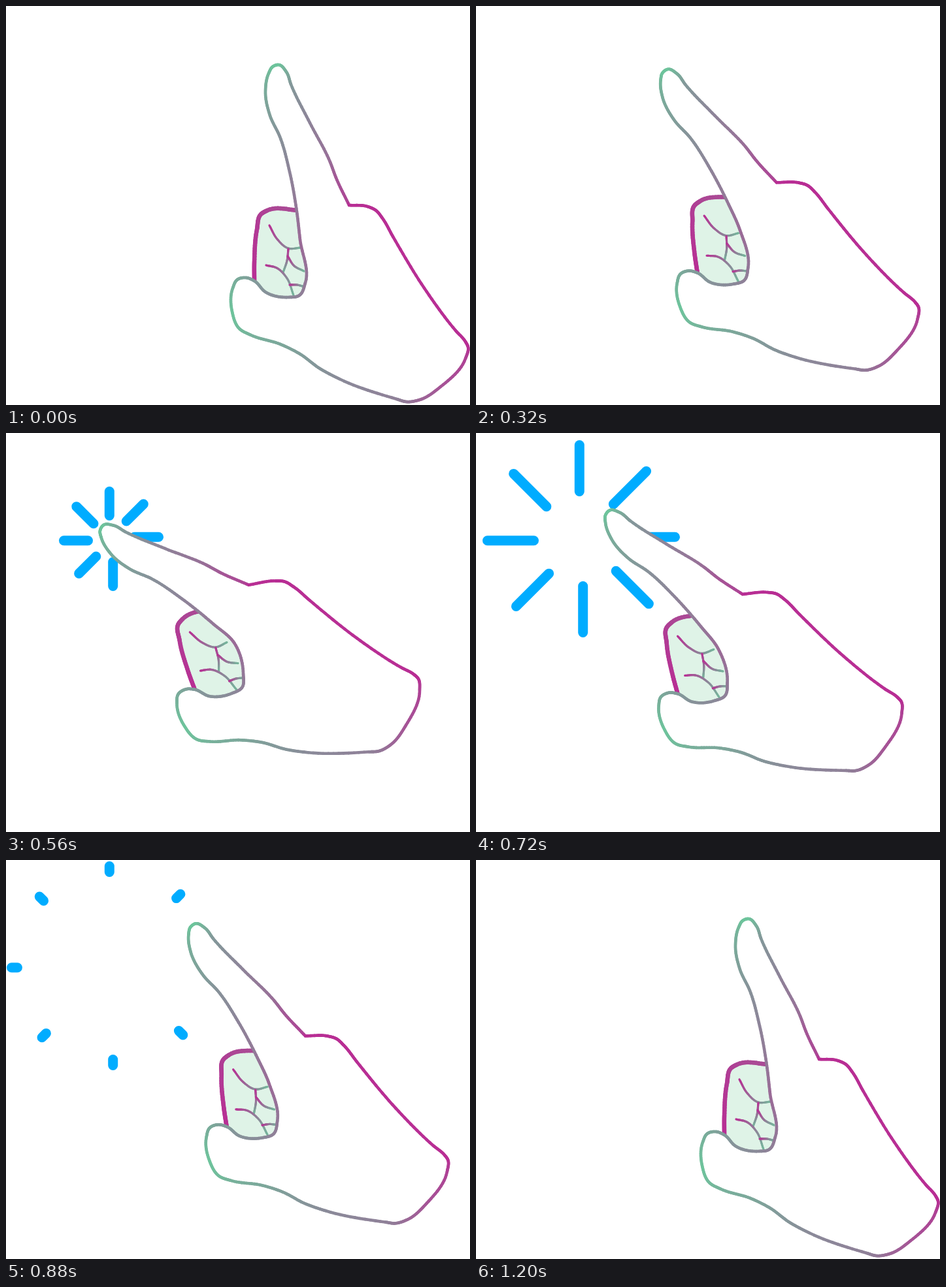
Write an HTML page with a canvas that moves like this. It is 710 px wide and 611 px high and loops after 1360 ms.

```html
<!DOCTYPE html>
<html lang="en">
<head>
<meta charset="utf-8">
<title>Tapping hand</title>
<style>
  html, body { margin: 0; height: 100%; overflow: hidden; background: #fff; }
  canvas { display: block; }
</style>
</head>
<body>
<canvas id="stage" width="710" height="611"></canvas>
<script>
const ctx = document.getElementById('stage').getContext('2d');
const LOOP = 1360, STEP = 80, HIT = 560, REST = 1200;
const GREEN = [110, 196, 156], MAGENTA = [184, 46, 148];

// The palm turns while it shifts; the finger turns further about its knuckle.
const PALM = { center: [566.5, 486.75], angle: -20, shift: [-80, -96] };
const FINGER = { center: [502, 336], angle: -21, shift: [0, 0] };

const clamp = (v, lo, hi) => Math.min(hi, Math.max(lo, v));

function tapAmount(ms) {
  if (ms <= HIT) return (ms / HIT) ** 1.55;
  const v = (REST - ms) / (REST - HIT);
  return .6 * v * v * (3 - 2 * v) + .4 * v ** 1.6;
}

function move([x, y], { center: [cx, cy], angle, shift }, amount) {
  const a = angle * amount * Math.PI / 180, c = Math.cos(a), s = Math.sin(a);
  const dx = x - cx, dy = y - cy;
  return [cx + dx * c - dy * s + shift[0] * amount, cy + dx * s + dy * c + shift[1] * amount];
}

// Adds a tint running evenly along the points: 0 green, 1 magenta.
const tinted = (from, to, pts) =>
  pts.map((p, i) => [...p, from + (to - from) * i / (pts.length - 1)]);

// Samples a smooth curve; a repeated point makes a sharp corner.
function smooth(pts, closed) {
  const n = pts.length, out = [];
  const at = i => closed ? pts[(i + n) % n] : pts[clamp(i, 0, n - 1)];
  const heading = i => {
    let hx = 0, hy = 0;
    for (const k of [i - 1, i]) {
      const a = at(k), b = at(k + 1), dx = b[0] - a[0], dy = b[1] - a[1];
      const d2 = dx * dx + dy * dy || 1;
      hx += dx / d2;
      hy += dy / d2;
    }
    const len = Math.hypot(hx, hy) || 1;
    return [hx / len, hy / len];
  };
  for (let i = 0; i < (closed ? n : n - 1); i++) {
    const a = at(i), b = at(i + 1), ha = heading(i), hb = heading(i + 1);
    const len = Math.hypot(b[0] - a[0], b[1] - a[1]);
    if (!len) continue;
    for (let k = 0; k < 12; k++) {
      const u = k / 12, w = 1 - u;
      const mix = j => a[j] * w * w * (w + 3 * u) + b[j] * u * u * (u + 3 * w)
        + len * u * w * (ha[j] * w - hb[j] * u);
      out.push([mix(0), mix(1), a[2] * w + b[2] * u]);
    }
  }
  out.push(at(closed ? 0 : n - 1));
  return out;
}

function fill(pts, color) {
  ctx.beginPath();
  pts.forEach(p => ctx.lineTo(p[0], p[1]));
  ctx.fillStyle = color;
  ctx.fill();
}

function line(x1, y1, x2, y2) {
  ctx.beginPath();
  ctx.moveTo(x1, y1);
  ctx.lineTo(x2, y2);
  ctx.stroke();
}

function tintedStroke(pts, width) {
  ctx.lineWidth = width;
  for (let i = 1; i < pts.length; i++) {
    const [x1, y1, c1] = pts[i - 1], [x2, y2, c2] = pts[i];
    const c = (c1 + c2) / 2;
    ctx.strokeStyle = `rgb(${GREEN.map((g, j) => Math.round(g + (MAGENTA[j] - g) * c))})`;
    line(x1, y1, x2, y2);
  }
}

function drawRays(ms) {
  const reach = t => clamp(72.5 + .444 * (t - HIT), 35.5, 152.5);
  const inner = reach(ms - 160), outer = reach(ms);
  if (outer - inner < 2) return;
  ctx.strokeStyle = '#00acff';
  ctx.lineWidth = 15;
  for (let i = 0; i < 8; i++) {
    ctx.save();
    ctx.translate(161, 162);
    ctx.rotate(i * Math.PI / 4);
    line(-2.7, -inner, -2.7, -outer);
    ctx.restore();
  }
}

function drawHand(amount) {
  const palm = (...pts) => pts.map(p => move(p, PALM, amount));
  const finger = (...pts) => palm(...pts.map(p => move(p, FINGER, amount)));
  const crease = (...pts) => tintedStroke(smooth(tinted(1, .1, palm(...pts))), 3.2);

  // Folded fingers
  const fold = smooth(tinted(.8, 1, palm(
    [450, 313], [400, 313], [390, 319], [384, 342], [380, 392], [380, 422])));
  fill([...fold, ...palm([370, 430], [400, 455], [480, 450], [480, 330])], '#dff3e7');
  tintedStroke(fold, 6.5);
  crease([403, 336], [415, 357], [432, 371], [451, 370]);
  crease([432, 372], [430, 390], [424, 408]);
  crease([431, 383], [441, 398], [456, 406]);
  crease([398, 397], [414, 401], [430, 417], [440, 443]);
  crease([434, 427], [445, 427], [457, 430]);

  // Outline, clockwise from the fingertip
  const outline = smooth([
    ...tinted(0, 1, finger([417, 90], [429, 101], [436, 120], [465, 179], [496, 239],
      [505, 263], [525, 305], [525, 305])),
    ...tinted(1, 1, palm([553, 307], [566, 313], [576, 325], [592, 353], [640, 432],
      [688, 497], [703, 514])),
    ...tinted(1, .5, palm([707, 522], [703, 540], [665, 583], [633, 603], [612, 606])),
    ...tinted(.45, 0, palm([598, 602], [510, 571], [480, 555], [450, 533], [420, 518],
      [375, 504], [357, 494], [346, 468])),
    ...tinted(.1, .5, palm([347, 432], [354, 419], [367, 416], [380, 421], [397, 438],
      [432, 446], [449, 443], [458, 424])),
    ...tinted(.6, 0, finger([450, 358], [445, 315], [434, 254], [419, 200], [404, 168],
      [397, 130], [402, 103], [408, 93]))
  ], true);
  fill(outline, '#fff');
  tintedStroke(outline, 4.6);
}

function draw(now) {
  const ms = Math.min(REST, Math.floor(now % LOOP / STEP) * STEP);
  ctx.clearRect(0, 0, 710, 611);
  drawRays(ms);
  drawHand(tapAmount(ms));
}

ctx.lineCap = ctx.lineJoin = 'round';
let start;
function tick(now) {
  start ??= now;
  draw(now - start);
  requestAnimationFrame(tick);
}
draw(0);
requestAnimationFrame(tick);
</script>
</body>
</html>
```
